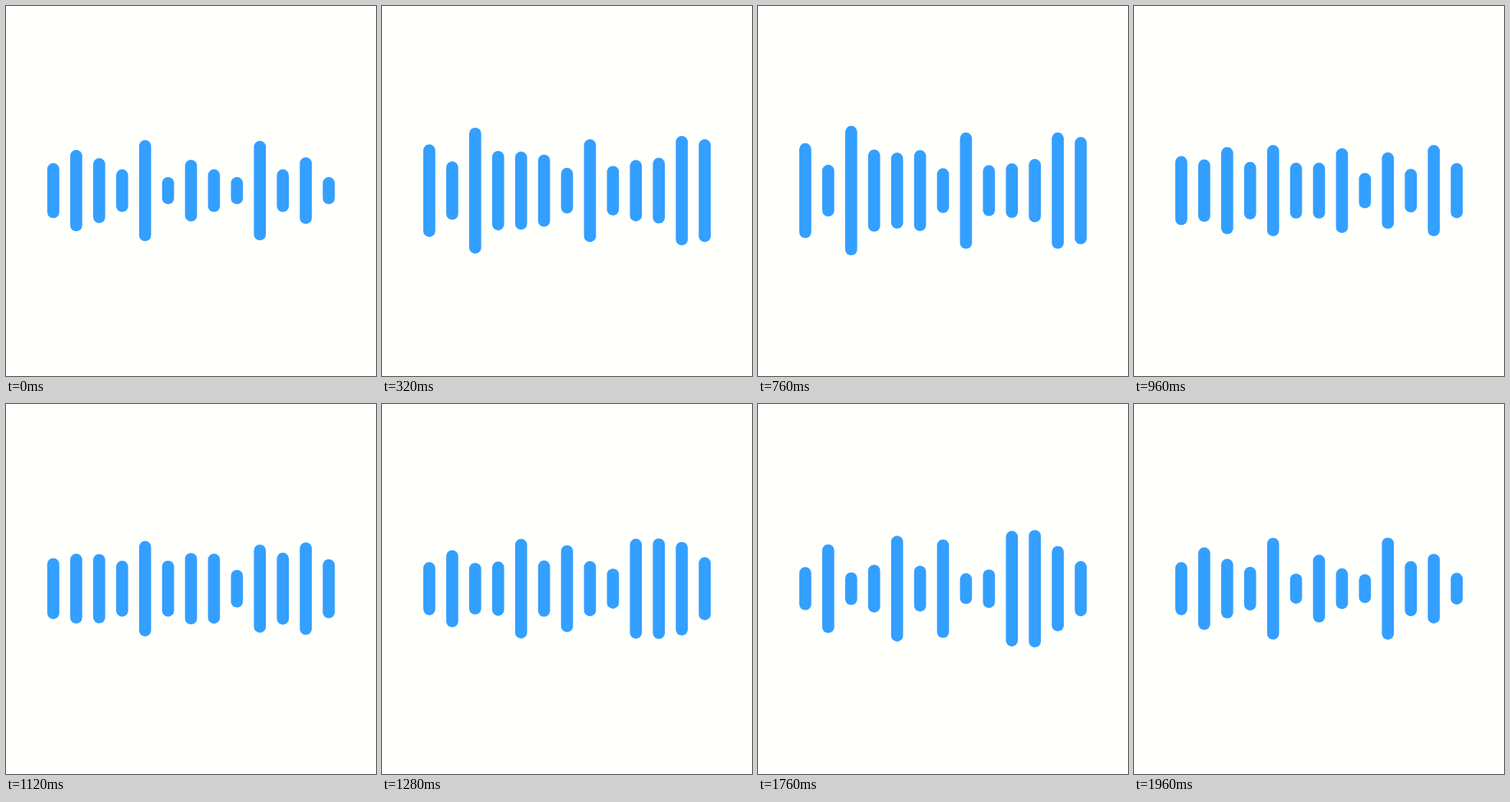
Recreate the animation shown at these times as an HTML page. Size 450x450 px, loop 2 s.

```html
<!DOCTYPE html>
<html lang="en">
<head>
<meta charset="utf-8">
<title>Sound wave</title>
<style>
  html, body { margin: 0; width: 100%; height: 100%; overflow: hidden; background: #fffffc; }
  svg { display: block; width: 100%; height: 100%; }
  rect { fill: #339fff; }
</style>
</head>
<body>
<svg id="wave" viewBox="0 0 450 450"></svg>
<script>
const LOOP = 2000, STEP = 40;
const LEFT = 50.2, PITCH = 27.92, WIDTH = 14.6, MIDDLE = 224.6;

// Four wave shapes (bar heights); the bars glide evenly from one to the next
const shapes = [
  { at: 0,    heights: [67, 99, 79, 52, 123, 33, 75, 52, 33, 121, 52, 81, 33] },
  { at: 560,  heights: [147, 50, 209, 130, 74, 129, 41, 180, 81, 40, 101, 172, 194] },
  { at: 960,  heights: [84, 76, 106, 70, 111, 68, 68, 103, 43, 93, 53, 111, 67] },
  { at: 1620, heights: [44, 113, 17, 62, 132, 69, 146, 29, 55, 152, 196, 117, 87] }
];
shapes.push({ at: LOOP, heights: shapes[0].heights });

const wave = document.getElementById("wave");
const bars = shapes[0].heights.map((_, i) => {
  const bar = document.createElementNS("http://www.w3.org/2000/svg", "rect");
  bar.setAttribute("x", LEFT + i * PITCH);
  bar.setAttribute("width", WIDTH);
  bar.setAttribute("rx", WIDTH / 2);
  wave.append(bar);
  return bar;
});

function draw(t) {
  const next = shapes.findIndex(shape => shape.at > t);
  const from = shapes[next - 1], to = shapes[next];
  const mix = (t - from.at) / (to.at - from.at);
  bars.forEach((bar, i) => {
    const height = from.heights[i] + (to.heights[i] - from.heights[i]) * mix;
    bar.setAttribute("y", MIDDLE - height / 2);
    bar.setAttribute("height", height);
  });
}

const start = performance.now();
function tick() {
  const t = (performance.now() - start) % LOOP;
  draw(Math.floor(t / STEP) * STEP);
  requestAnimationFrame(tick);
}
tick();
</script>
</body>
</html>
```
